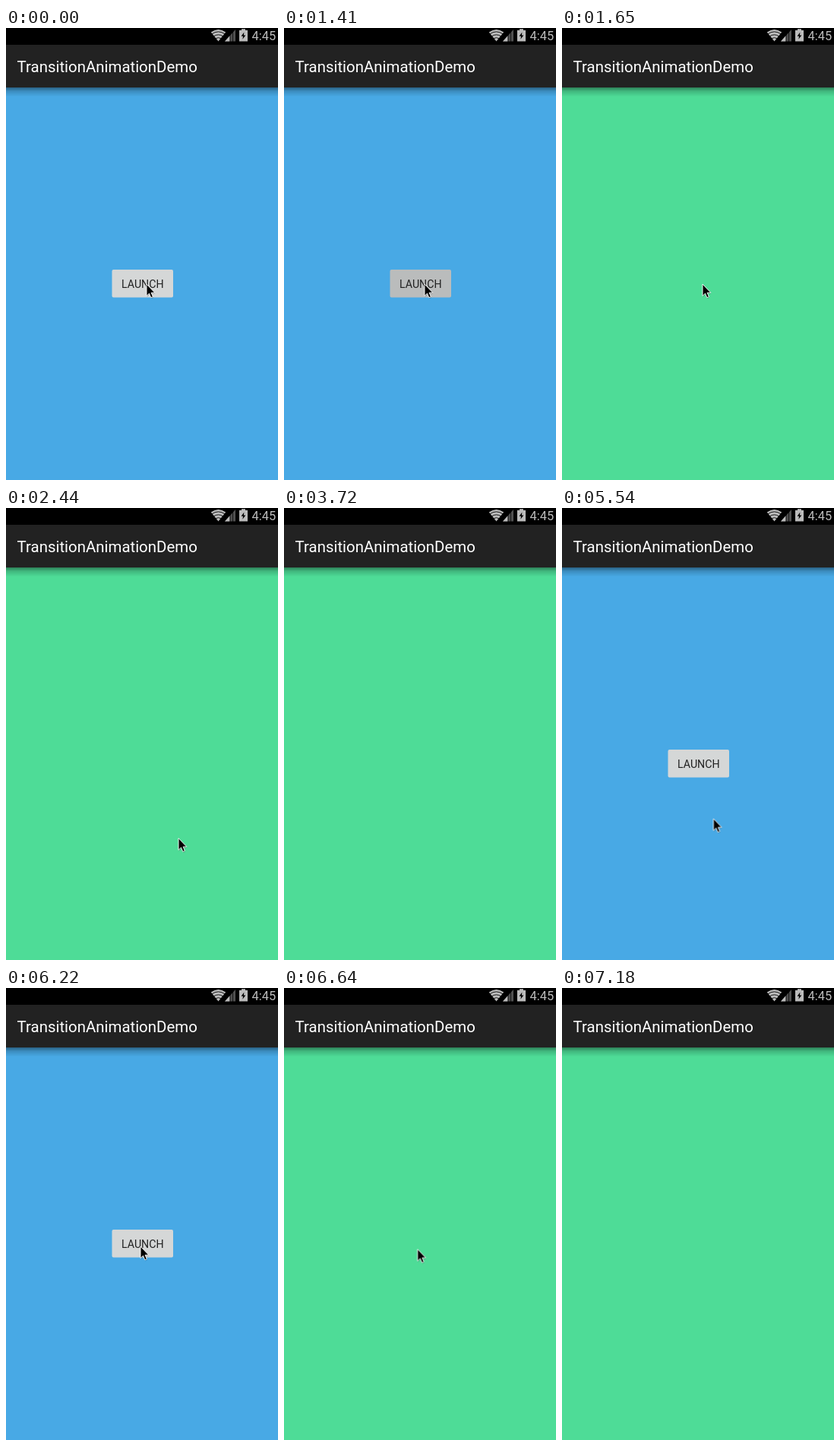
Write an HTML page that moves like this. It is 358 px wide and 593 px high and loops after 8 s.

```html
<!DOCTYPE html>
<html lang="en">
<head>
<meta charset="utf-8">
<title>Transition demo</title>
<style>
  html, body { margin: 0; width: 100%; height: 100%; overflow: hidden; background: #000; }
  svg { display: block; width: 358px; height: 593px; }
  text { font-family: Roboto, "Noto Sans", sans-serif; }
  .green, .button { animation: 8s step-end infinite; }
  .green { animation-name: screen; }
  .button { animation-name: press; }
  .cursor { animation: move 8s linear infinite; }

  /* Second screen opens and closes with hard cuts */
  @keyframes screen {
    0% { opacity: 0; }
    20.625% { opacity: 1; }
    58.75% { opacity: 0; }
    79.25%, 100% { opacity: 1; }
  }
  @keyframes press {
    0% { fill: #d5d7d7; }
    17.625% { fill: #babcbc; }
    19.125% { fill: #d5d7d7; }
    75.5% { fill: #c8caca; }
    75.875% { fill: #babcbc; }
    77.75%, 100% { fill: #d5d7d7; }
  }
  @keyframes move {
    0% { transform: translate(185px, 336px); }
    26.7% { transform: translate(185px, 336px); animation-timing-function: cubic-bezier(.35, .2, .65, 1); }
    36.875% { transform: translate(290px, 579px); }
    42.125%, 44.4% { transform: translate(299px, 589px); }
    46.5% { transform: translate(264px, 595px); animation-timing-function: step-end; }
    63.7% { transform: translate(260px, 594px); animation-timing-function: cubic-bezier(.3, .2, .6, 1); }
    73.25% { transform: translate(177px, 339px); }
    82.7% { transform: translate(177px, 339px); animation-timing-function: cubic-bezier(.4, .1, .75, .9); }
    89.75%, 100% { transform: translate(86px, 596px); }
  }
</style>
</head>
<body>
<svg viewBox="0 0 358 593">
  <defs>
    <linearGradient id="shade" x2="0" y2="1">
      <stop offset="0" stop-opacity=".42"/>
      <stop offset=".4" stop-opacity=".17"/>
      <stop offset="1" stop-opacity="0"/>
    </linearGradient>
  </defs>

  <rect y="78" width="358" height="515" fill="#48a9e5"/>
  <rect class="button" x="139.5" y="317" width="80.5" height="36.5" rx="2"/>
  <text x="179.8" y="341" font-size="14.2" text-anchor="middle" fill="#212121">LAUNCH</text>
  <rect class="green" y="78" width="358" height="515" fill="#4edc97"/>
  <rect y="78" width="358" height="12" fill="url(#shade)"/>

  <rect width="358" height="22"/>
  <rect y="22" width="358" height="56" fill="#222"/>
  <text x="14.6" y="58" font-size="20.42" fill="#fff">TransitionAnimationDemo</text>

  <g fill="#bcbcbc">
    <path d="M279.5 17.5L269.8 5.6Q279.5-1.6 289.2 5.6Z"/>
    <path d="M270.5 8.1Q279.5 1.7 288.5 8.1M273 11.1Q279.5 6.6 286 11.1M275.5 14Q279.5 11.3 283.5 14" fill="none" stroke="#000" stroke-width=".9"/>
    <path d="M288 17.5L302 2V17.5Z" fill="#505050"/>
    <path d="M288 17.5L294.5 10.3V17.5Z"/>
    <path d="M295 2V18M298.5 2V18" stroke="#000" stroke-width=".7"/>
    <path d="M310 1.2h5v1.8h3v14.5h-11V3h3Z"/>
    <path d="M313.4 5.5L309.6 10.8h2.4l-.6 4 4-5.2h-2.5Z" fill="#000"/>
    <text x="323.6" y="16" font-size="16.4">4:45</text>
  </g>

  <g class="cursor">
    <path d="M.5 1.5V17l3.5-3.3 2.4 5.4 2.6-1.1-2.3-5.2h4.8Z" opacity=".2"/>
    <path d="M0 0V15.5l3.5-3.3 2.3 5.5 2.6-1.1-2.3-5.3h4.7Z" stroke="#fff" stroke-width=".9"/>
  </g>
</svg>
</body>
</html>
```
